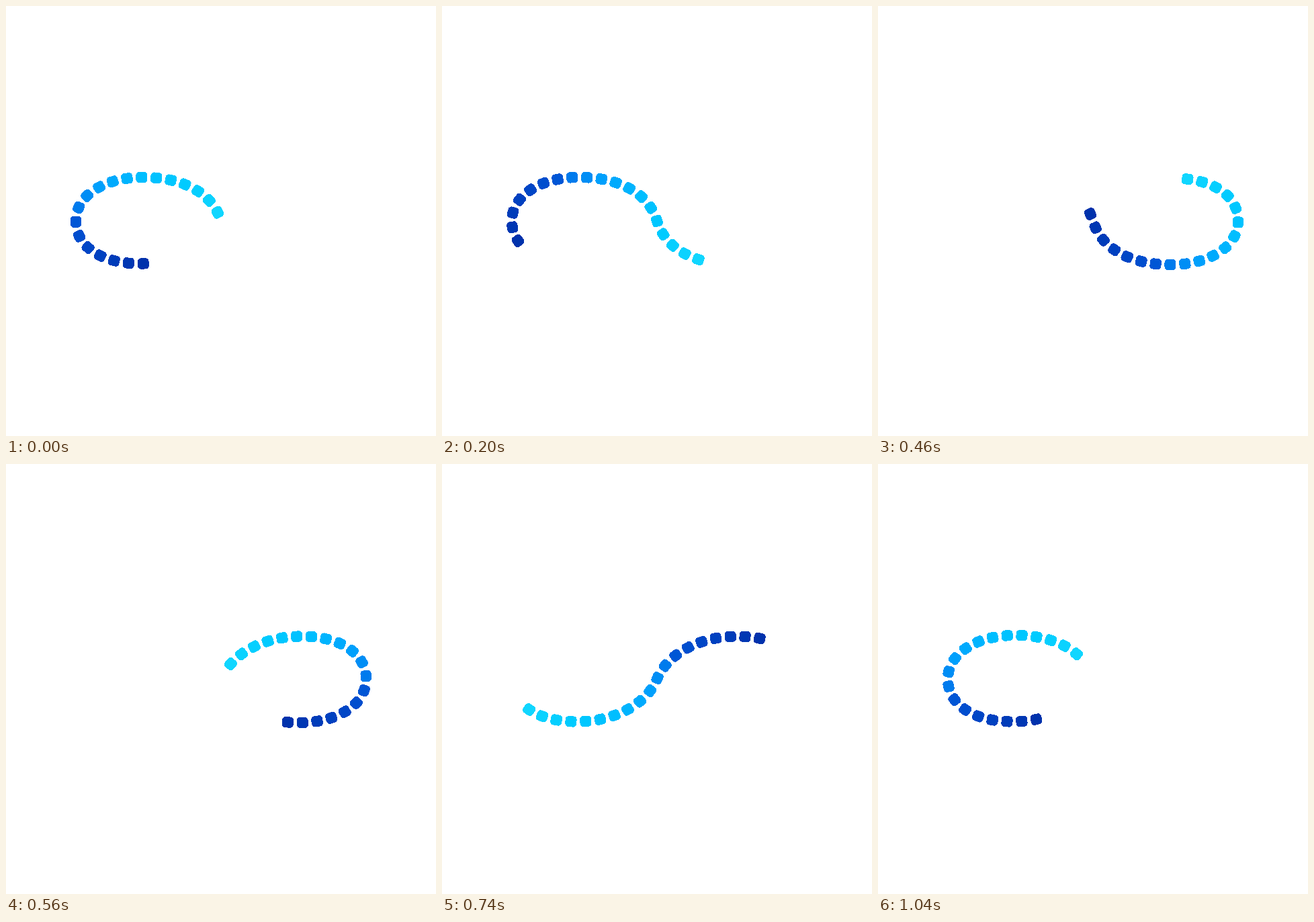
Recreate the animation shown at these times as an HTML page. Size 640x640 px, loop 1.06 s.

```html
<!DOCTYPE html>
<html lang="en">
<head>
<meta charset="utf-8">
<title>Infinity loader</title>
<style>
  html, body { margin: 0; width: 100%; height: 100%; overflow: hidden; background: #fff; }
  svg { display: block; width: 100%; height: 100%; }
  rect { shape-rendering: crispEdges; }
</style>
</head>
<body>
<svg id="stage" viewBox="0 0 640 640">
  <path id="track" fill="none" d="M320 320
    C330.5 355.5 368 385 436 385
    C494 385 536 357.7 536 320
    C536 281.9 497.6 256.5 440 256.5
    C378 256.5 334.2 286 320 320
    C305.8 354 262 383.5 200 383.5
    C142.4 383.5 104 358.1 104 320
    C104 282.3 146 255 204 255
    C272 255 309.5 284.5 320 320"/>
</svg>
<script>
const LOOP = 1060;
const STEP = 20;
const COUNT = 19;
const SLOTS = 50; // bead spacings around the whole track
// [bead index from the tail, rgb]
const STOPS = [
  [0, [0, 50, 172]],
  [4, [0, 70, 198]],
  [6, [0, 86, 213]],
  [7, [0, 123, 237]],
  [9, [0, 160, 252]],
  [12, [0, 190, 255]],
  [15, [0, 203, 255]],
  [18, [16, 214, 255]]
];

const stage = document.getElementById('stage');
const track = document.getElementById('track');
const length = track.getTotalLength();

function colorAt(index) {
  const next = Math.max(1, STOPS.findIndex(([at]) => at >= index));
  const [from, a] = STOPS[next - 1];
  const [to, b] = STOPS[next];
  const k = (index - from) / (to - from);
  return `rgb(${a.map((v, c) => Math.round(v + (b[c] - v) * k))})`;
}

function makeBead(_, index) {
  const rect = document.createElementNS('http://www.w3.org/2000/svg', 'rect');
  const shape = { x: -8.5, y: -8.1, width: 17, height: 16.2, rx: 5, fill: colorAt(index) };
  for (const name in shape) rect.setAttribute(name, shape[name]);
  return stage.appendChild(rect);
}

const beads = Array.from({ length: COUNT }, makeBead);

function pointAt(distance) {
  return track.getPointAtLength((distance % length + length) % length);
}

// Ease in and out, slightly flatter than a sine, cut off before it comes to rest.
function headSlot(time) {
  const phase = 0.00258 * (time - 570);
  return 24.41 + 25.05 * Math.sin(phase) - 0.12 * Math.sin(3 * phase);
}

function render(time) {
  const head = headSlot(time);
  beads.forEach((bead, index) => {
    const distance = (head - (COUNT - 1 - index)) * length / SLOTS;
    const p = pointAt(distance);
    const a = pointAt(distance - 1);
    const b = pointAt(distance + 1);
    const angle = Math.atan2(b.y - a.y, b.x - a.x) * 180 / Math.PI;
    bead.setAttribute('transform', `translate(${p.x} ${p.y}) rotate(${angle})`);
  });
}

const start = performance.now();

function tick() {
  const time = (performance.now() - start) % LOOP;
  render(Math.floor(time / STEP) * STEP);
  requestAnimationFrame(tick);
}

tick();
</script>
</body>
</html>
```
